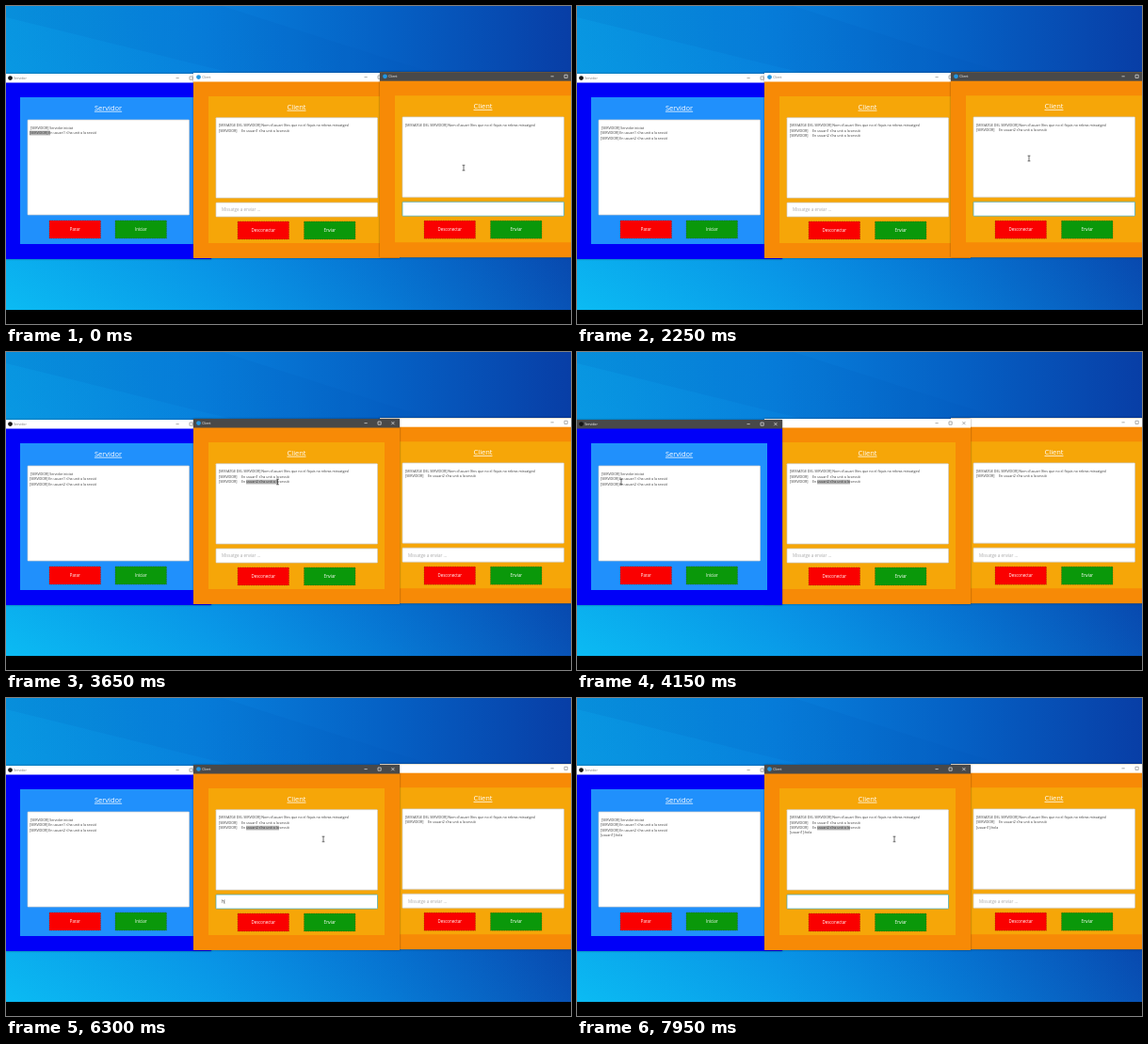
An HTML page for the animation above (8 s loop, 600 px wide and 338 px high).

```html
<!DOCTYPE html>
<html lang="ca">
<head>
<meta charset="utf-8">
<title>Servidor i clients</title>
<style>
  html, body { margin: 0; width: 100%; height: 100%; overflow: hidden; background: #000; }
  svg { display: block; width: 100vw; height: 100vh; }
  text { font-family: "Open Sans", "Noto Sans", sans-serif; white-space: pre; }
  .window { filter: drop-shadow(0 .5px 1.3px rgba(0, 0, 0, .4)); }
  .log { font-size: 3.6px; fill: #383838; }
  .input, .button { font-size: 4.5px; }
  .button { font-size: 4.4px; fill: #fff; text-anchor: middle; }
  .heading { font-size: 7.5px; fill: #fff; text-anchor: middle; text-decoration: underline; }
  .caption { font-size: 3.5px; }
</style>
</head>
<body>
<svg viewBox="0 0 600 338" preserveAspectRatio="none">
  <defs>
    <linearGradient id="sky">
      <stop offset="0" stop-color="#0898e0"/>
      <stop offset=".35" stop-color="#0780dc"/>
      <stop offset=".68" stop-color="#0560c4"/>
      <stop offset="1" stop-color="#083ea6"/>
    </linearGradient>
    <linearGradient id="glow" x1="0" y1="1" x2=".65" y2=".25">
      <stop offset="0" stop-color="#0cc4f8" stop-opacity=".8"/>
      <stop offset=".5" stop-color="#0aa0ee" stop-opacity=".35"/>
      <stop offset="1" stop-color="#0878d8" stop-opacity="0"/>
    </linearGradient>
  </defs>
  <rect width="600" height="323" fill="url(#sky)"/>
  <rect width="600" height="323" fill="url(#glow)"/>
  <path d="M0 0H230L600 118V160L0 12Z" fill="#0050b0" opacity=".1"/>
  <g id="scene"></g>
  <rect y="323" width="600" height="15"/>
</svg>
<script>
const LOOP = 8000;
const GUEST_SENT = 1300, PICK_TEXT = 3450, PICK_SERVER = 4050, PICK_INPUT = 5250, HELLO_SENT = 7150;
const scene = document.getElementById('scene');

const pointerPath = [
  [0, 486, 172], [1750, 486, 172], [2200, 480, 162], [2600, 480, 162], [3150, 258, 136],
  [3350, 258, 136], [3450, 255, 138], [3680, 290, 138], [4020, 47, 138], [4350, 47, 138],
  [5050, 283, 224], [5300, 283, 224], [5850, 337, 150], [LOOP, 337, 150]
];

const rect = (x, y, w, h, fill, extra = '') =>
  `<rect x="${x}" y="${y}" width="${w}" height="${h}" fill="${fill}" ${extra}/>`;
const text = (x, y, cls, content, extra = '') =>
  `<text x="${x}" y="${y}" class="${cls}" ${extra}>${content}</text>`;

function pointerAt(t) {
  const i = pointerPath.findIndex(p => p[0] > t);
  const [t0, x0, y0] = pointerPath[i - 1], [t1, x1, y1] = pointerPath[i];
  const u = (t - t0) / (t1 - t0), k = u * u * (3 - 2 * u);
  return [x0 + (x1 - x0) * k, y0 + (y1 - y0) * k];
}

// Typed text with a caret that stays on after each key, then blinks.
function typing(t, word, keyTimes, focusTime, sendTime) {
  const count = keyTimes.filter(k => k <= t).length;
  const sent = t >= sendTime;
  const lastKey = sent ? sendTime : count ? keyTimes[count - 1] : focusTime;
  const caret = Math.floor((t - lastKey) / 500) % 2 === 0;
  return (sent ? '' : word.slice(0, count)) + (caret ? '<tspan dx="-.9" fill="#000">|</tspan>' : '');
}

function button(x, y, label, fill) {
  return rect(x, y, 54.5, 19, fill, 'stroke="#402000" stroke-opacity=".45" stroke-width=".6" stroke-dasharray="1.5 1"') +
    text(x + 27.3, y + 11, 'button', label);
}

function frame(x, y, name, active, icon, body, panel) {
  const ink = active ? '#fff' : '#777';
  return rect(x, y, 219, 197, body) +
    rect(x, y, 219, 9.5, active ? '#494949' : '#fff') +
    `<circle cx="${x + 5.5}" cy="${y + 4.6}" r="2.4" fill="${icon}"/>` +
    text(x + 9.2, y + 6, 'caption', name, `fill="${ink}"`) +
    `<path transform="translate(${x} ${y + 4.6})" d="M181.5 0h3.2M196 -1.6h3.2v3.2h-3.2zM210.3 -1.6l3.2 3.2m0-3.2l-3.2 3.2" fill="none" stroke="${ink}" stroke-width=".6"/>` +
    rect(x + 16, y + 25, 187, 156, panel) +
    text(x + 109.5, y + 38.8, 'heading', name);
}

const area = (x, y, h, stroke = '#ccc') =>
  rect(x, y, 171.5, h, '#fff', `rx=".6" stroke="${stroke}" stroke-width=".7"`);

const joined = user => `En ${user} s'ha unit a la sessió`;
const notice = (x, y, user) => text(x, y, 'log', '[SERVIDOR]') + text(x + 24, y, 'log', joined(user));
const hello = '[usuari1]:hola';

function serverWindow(t, active) {
  const x = -1, y = 72;
  return frame(x, y, 'Servidor', active, '#151515', '#0000f8', '#2090fc') +
    area(23, 121, 101) +
    (t < GUEST_SENT ? rect(25, 132.6, 22, 4.8, '#b0b0b0') : '') +
    text(26, 130.5, 'log', '[SERVIDOR] Servidor iniciat') +
    text(25, 136.3, 'log', '[SERVIDOR] ' + joined('usuari1')) +
    (t >= GUEST_SENT ? text(25, 141.6, 'log', '[SERVIDOR] ' + joined('usuari2')) : '') +
    (t >= HELLO_SENT ? text(25, 147, 'log', hello) : '') +
    button(46, 228, 'Parar', '#fa0000') + button(116, 228, 'Iniciar', '#0a980a');
}

function clientWindow(x, y, active, focused, typed, logLines) {
  return frame(x, y, 'Client', active, '#2296e0', '#f78a06', '#f6a608') +
    area(x + 24, y + 47.7, 85.3) +
    text(x + 27, y + 57.4, 'log', "[MISSATGE DEL SERVIDOR] Nom d'usuari (fins que no el fiquis no rebras missatges)") +
    logLines +
    area(x + 24, y + 138, 15, focused ? '#38a8c0' : '#ccc') +
    text(x + 30, y + 147.3, 'input', focused ? typed : 'Missatge a enviar ...', `fill="${focused ? '#333' : '#aaa'}"`) +
    button(x + 47, y + 158, 'Desconectar', '#fa0000') + button(x + 117.5, y + 158, 'Enviar', '#0a980a');
}

function firstClient(t, active) {
  const drag = Math.max(0, pointerAt(Math.min(t, 3680))[0] - 255);
  const log =
    (t >= PICK_TEXT ? rect(255, 135.8, drag, 4.6, '#b0b0b0') : '') +
    notice(226, 133.8, 'usuari1') +
    (t >= GUEST_SENT ? notice(226, 139.3, 'usuari2') : '') +
    (t >= HELLO_SENT ? text(226, 144.4, 'log', hello) : '');
  const typed = typing(t, 'hola', [6200, 6370, 6540, 6710], PICK_INPUT, HELLO_SENT);
  return clientWindow(199, 71, active, t >= PICK_INPUT, typed, log);
}

function secondClient(t, active) {
  const log =
    (t >= GUEST_SENT ? notice(424, 133.3, 'usuari2') : '') +
    (t >= HELLO_SENT ? text(424, 138.8, 'log', hello) : '');
  const typed = typing(t, 'usuari2', [100, 230, 360, 490, 620, 750, 1050], -500, GUEST_SENT);
  return clientWindow(397, 70.2, active, t < PICK_TEXT, typed, log);
}

function stacking(t) {
  if (t < PICK_TEXT) return [serverWindow, firstClient, secondClient];
  if (t < PICK_SERVER) return [serverWindow, secondClient, firstClient];
  if (t < PICK_INPUT) return [secondClient, firstClient, serverWindow];
  return [secondClient, serverWindow, firstClient];
}

function picture(t) {
  const [px, py] = pointerAt(t);
  return stacking(t).map((draw, i) => `<g class="window">${draw(t, i === 2)}</g>`).join('') +
    `<path transform="translate(${px.toFixed(1)} ${py.toFixed(1)})" d="M-1.4 -2.8H1.4M0 -2.8V2.8M-1.4 2.8H1.4" fill="none" stroke="#333" stroke-width=".7"/>`;
}

let shown = '';
function tick() {
  const next = picture(performance.now() % LOOP);
  if (next !== shown) scene.innerHTML = shown = next;
  requestAnimationFrame(tick);
}
tick();
</script>
</body>
</html>
```
